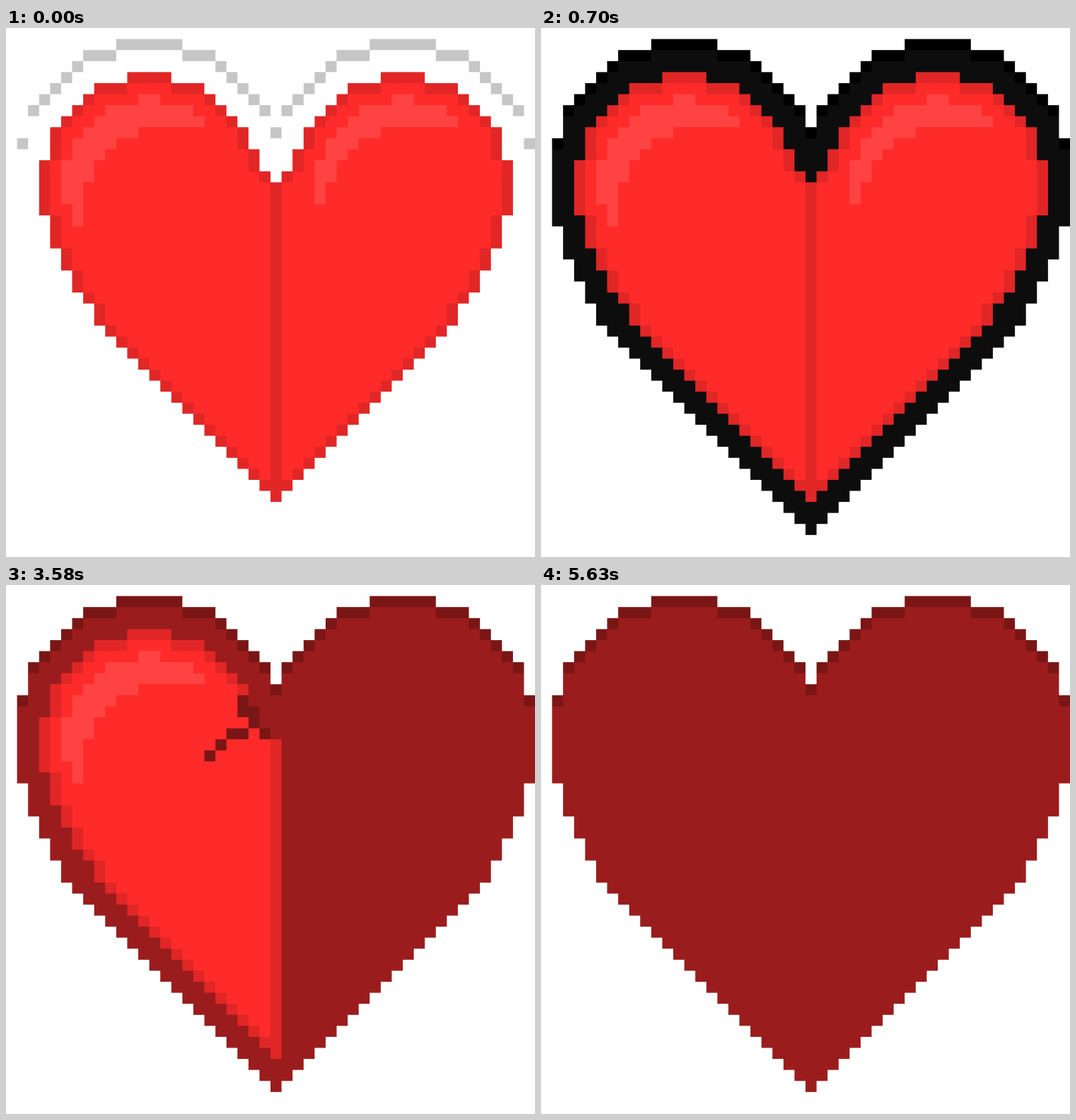
Write an HTML page with a canvas that moves like this. It is 748 by 748 pixels and loops after 6.13 s.

```html
<!DOCTYPE html>
<html lang="en">
<head>
<meta charset="utf-8">
<title>Breaking heart</title>
<style>
  html, body { margin: 0; width: 100%; height: 100%; overflow: hidden; background: #fff; }
  canvas { display: block; width: 100vw; height: 100vh; }
</style>
</head>
<body>
<canvas id="stage" width="768" height="768"></canvas>
<script>
const ctx = document.getElementById('stage').getContext('2d');
const CELL = 16, GRID = 48, MIDDLE = 24, LOBE = 13, LOOP = 6130;
const WINE = '#9b1c1c', DARK_WINE = '#7a1616';

// Leftmost column of a disc in a row; NaN where the row misses the disc.
const discLeft = (cx, r, dy) => Math.round(cx - Math.sqrt(r * r - dy * dy));

// Round lobe on top, bent flank below it, then a diagonal to the tip; mirrored.
function heart({ cy, r, sag, turn, flank, slope, notch, tip }) {
  const cells = new Map();
  const add = (x, y) => cells.set(x + ',' + y, [x, y]);
  for (let y = 0; y <= tip; y++) {
    const row = y + 0.5;
    const left = y < turn
      ? discLeft(LOBE, r, Math.max(cy - row, row - cy - sag))
      : Math.floor(Math.max(flank + slope * (y - turn), y - tip + MIDDLE));
    let right = 2 * LOBE - left;
    if (y > notch - 4) right = Math.max(right, Math.floor(25.2 + 0.7 * (y - notch)));
    if (y >= notch) right = MIDDLE + 1;
    for (let x = left; x < right; x++) {
      add(x, y);
      add(GRID - x, y);
    }
  }
  return cells;
}

const outer = heart({ cy: 13, r: 12, sag: 2, turn: 21, flank: 3, slope: 0.5, notch: 9, tip: 45 });
const inner = heart({ cy: 14.2, r: 9.87, sag: 0, turn: 19, flank: 4.45, slope: 0.6, notch: 14, tip: 42 });
const has = (cells, x, y) => cells.has(x + ',' + y);

const caps = [...outer.values()].filter(([x, y]) => !has(outer, x, y - 1));
const ring = [...outer.values()].filter(([x, y]) => !has(inner, x, y));
const flesh = [...inner.values()];
const rim = flesh.filter(([x, y]) => x === MIDDLE ||
  !has(inner, x - 1, y) || !has(inner, x + 1, y) || !has(inner, x, y - 1) || !has(inner, x, y + 1));
const leftHalf = flesh.filter(([x]) => x <= MIDDLE);
const rightHalf = flesh.filter(([x]) => x > MIDDLE);

// A crescent: one disc with a lower one cut out of it.
function crescent(cx, cutX) {
  const cells = [];
  for (let y = 6; y < 18; y++) {
    const left = discLeft(cx, 7.84, y + 0.5 - 14.2);
    const right = discLeft(cutX, 8, y + 0.5 - 17) || 2 * cx - left;
    for (let x = left; x < right; x++) cells.push([x, y]);
  }
  return cells;
}
const shine = [...crescent(LOBE, 15), ...crescent(36, 37)];

// Cells met by a polyline sampled at about every half cell.
function trace(points) {
  const cells = new Map();
  points.slice(1).forEach(([x2, y2], i) => {
    const [x1, y1] = points[i];
    const n = Math.round(2 * Math.max(Math.abs(x2 - x1), Math.abs(y2 - y1)));
    for (let k = 0; k <= n; k++) {
      const x = Math.floor(x1 + (x2 - x1) * k / n), y = Math.floor(y1 + (y2 - y1) * k / n);
      cells.set(x + ',' + y, [x, y]);
    }
  });
  return [...cells.values()];
}

const stepTime = (from, to, k, count) => from + (to - from) * (k / Math.max(1, count - 1)) ** 1.585;
const stepsDone = (t, from, to, count) => {
  let k = 0;
  while (k < count && t >= stepTime(from, to, k, count)) k++;
  return k;
};

const stroke = (from, to, ...points) => ({ from, to, cells: trace(points) });
const rightCracks = [
  stroke(770, 1290, [34.5, 32.5], [32.5, 32.5], [32.3, 31.7], [28.4, 26.3]),
  stroke(770, 900, [32.5, 34.5], [33.4, 33.4], [32.5, 33.5]),
  stroke(1390, 1540, [29.7, 30.2], [27.3, 31.3]),
  stroke(2040, 2600, [43.5, 8.5], [41.97, 8.6], [37.745, 15.3]),
  stroke(2040, 2150, [41.5, 6.5], [42.5, 7.5], [42.5, 8.5]),
  stroke(2380, 2500, [39.7, 10.3], [37.3, 9.1])
];
const leftCracks = [
  stroke(3350, 3500, [21.3, 10.4], [23.3, 13.4]),
  stroke(3500, 3880, [21.4, 13.2], [18.7, 15.1], [16.6, 15.8], [14.7, 17.1]),
  stroke(3980, 4130, [18.7, 13.8], [16.3, 12.7]),
  stroke(4630, 5180, [5.5, 21.5], [6.5, 22.5], [13.5, 25.5]),
  stroke(4630, 4700, [6.5, 23.5], [7.5, 23.5]),
  stroke(4630, 5180, [14.5, 32.5], [13.5, 31.5], [19.4, 22.4]),
  stroke(4630, 4700, [12.5, 30.5], [13.5, 30.5]),
  stroke(5280, 5280, [19.5, 21.5], [19.5, 21])
];

function fill(cells, color) {
  ctx.fillStyle = color;
  for (const [x, y] of cells) ctx.fillRect(x * CELL, y * CELL, CELL, CELL);
}

// The outline flickers white and black, then black and wine, and stays wine.
function drawOutline(t) {
  const beat = Math.floor(t / 70);
  const black = beat < 11 && beat % 2 === (beat < 7 ? 1 : 0);
  if (beat < 7 && !black) return fill(caps, '#c6c6c6');
  fill(ring, black ? '#0d0d0d' : WINE);
  fill(caps, black ? '#000' : DARK_WINE);
}

// A half cracks, darkens in three hard steps and ends up plain.
function drawHalf(t, cells, cracks, fadeAt) {
  const level = stepsDone(t, fadeAt, fadeAt + 150, 3);
  ctx.globalAlpha = level / 3;
  fill(cells, WINE);
  ctx.globalAlpha = 1;
  if (level === 3) return;
  for (const { from, to, cells: path } of cracks) {
    fill(path.slice(0, stepsDone(t, from, to, path.length)), DARK_WINE);
  }
}

function draw(t) {
  ctx.fillStyle = '#fff';
  ctx.fillRect(0, 0, GRID * CELL, GRID * CELL);
  drawOutline(t);
  fill(flesh, '#ff2a2a');
  fill(rim, '#e12626');
  fill(shine, '#ff4242');
  drawHalf(t, rightHalf, rightCracks, 2700);
  drawHalf(t, leftHalf, leftCracks, 5480);
}

const begin = performance.now();
function tick() {
  draw((performance.now() - begin) % LOOP);
  requestAnimationFrame(tick);
}
tick();
</script>
</body>
</html>
```
